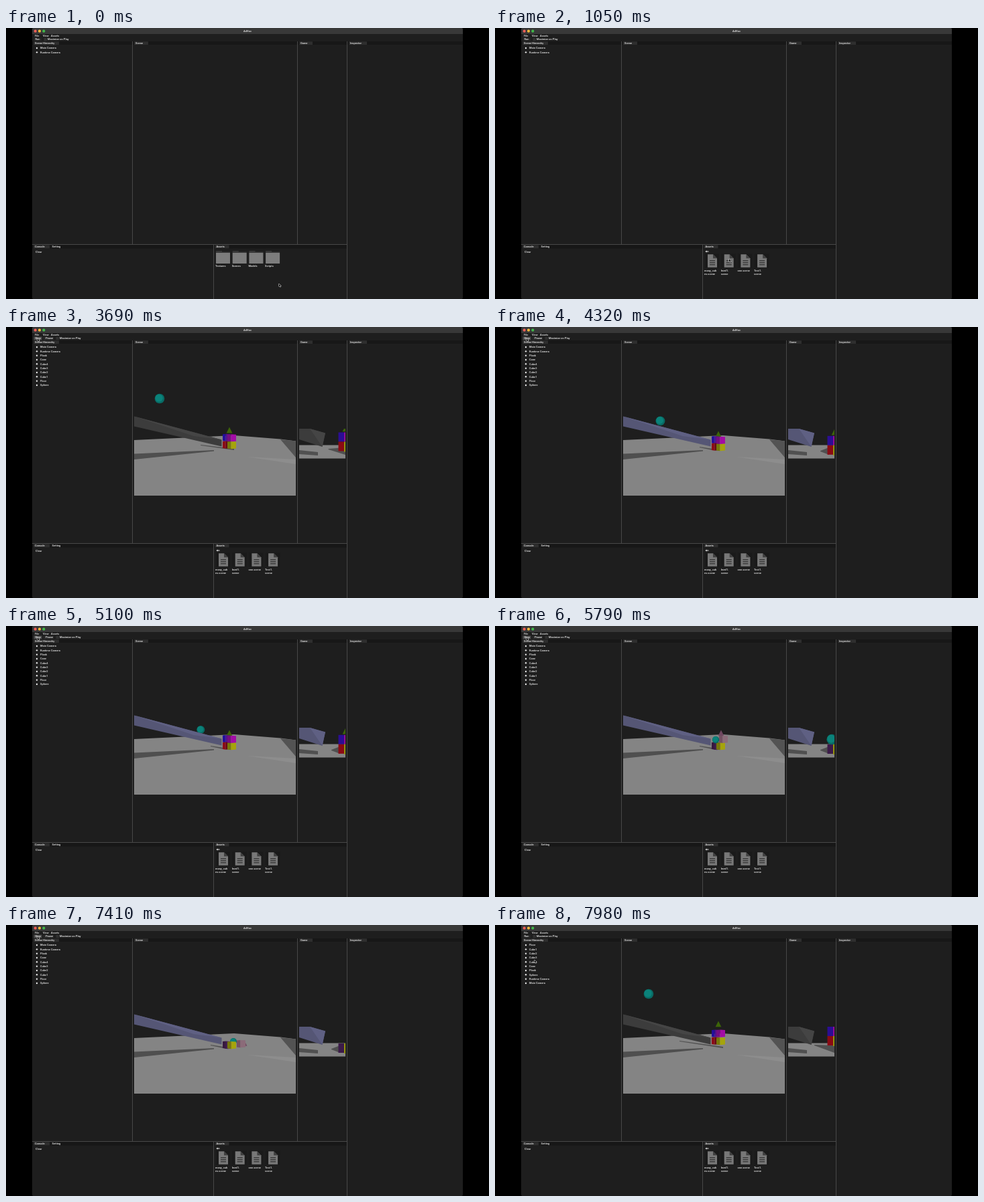
Animation of 720 by 405 pixels, one loop 8 s. Source, as an HTML page with a canvas:

```html
<!DOCTYPE html>
<html lang="en">
<head>
<meta charset="utf-8">
<style>
html, body { margin: 0; width: 100%; height: 100%; overflow: hidden; background: #000; }
canvas { display: block; width: 720px; height: 405px; }
</style>
</head>
<body>
<canvas id="stage" width="720" height="405"></canvas>
<script>
const ctx = document.getElementById('stage').getContext('2d');
const LOOP = 8000;
const OPEN = 930, DRAG = 1840, DROP = 2460, PLAY = 3520, CONTACT = 4010, HIT = 5650, STOP = 7500;
const FOLDERS = ['Textures', 'Scenes', 'Models', 'Scripts'];
const FILES = ['many_cub es.scene', 'level1. scene', 'one.scene', 'Test1. scene'];
const CAMERAS = ['Main Camera', 'Runtime Camera'];
const CUBES = ['Cube1', 'Cube2', 'Cube3', 'Cube4'];
const LOADED = [...CAMERAS, 'Plank', 'Cone', ...[...CUBES].reverse(), 'Floor', 'Sphere'];
const RELOADED = ['Floor', ...CUBES, 'Cone', 'Plank', 'Sphere', ...[...CAMERAS].reverse()];
const MOVES = [
  { start: 510, time: 270, x: 349, y: 345 },
  { start: 1680, time: 600, x: 334, y: 227 },
  { start: 2700, time: 690, x: 47, y: 17 },
  { start: 7540, time: 400, x: 59, y: 52 }
];

const mix = (a, b, p) => a + (b - a) * p;
const progress = (t, start, time) => Math.max(0, Math.min(1, (t - start) / time));
const smooth = p => p * p * (3 - 2 * p);

function box(x, y, w, h, color) {
  ctx.fillStyle = color;
  ctx.fillRect(x, y, w, h);
}

function shape(color, path) {
  ctx.fillStyle = color;
  ctx.fill(new Path2D(path));
}

// A strip with upright ends, each given by its top and height.
function strip(color, x0, top0, h0, x1, top1, h1) {
  shape(color, `M${x0} ${top0}L${x1} ${top1}v${h1}L${x0} ${top0 + h0}Z`);
}

function disc(x, y, r, color) {
  ctx.fillStyle = color;
  ctx.beginPath();
  ctx.arc(x, y, r, 0, Math.PI * 2);
  ctx.fill();
}

function text(str, x, y) {
  ctx.font = '500 4px Roboto, sans-serif';
  ctx.fillStyle = '#ececec';
  ctx.fillText(str, x, y);
}

function clipped(x, y, w, h, draw) {
  ctx.save();
  ctx.beginPath();
  ctx.rect(x, y, w, h);
  ctx.clip();
  draw();
  ctx.restore();
}

function tab(label, x, y, w) {
  box(x - 2, y - 2.3, w, 4.8, '#2e2e2e');
  text(label, x, y + 0.2);
}

function drawWindow() {
  box(0, 0, 720, 405, '#000');
  ctx.fillStyle = '#1e1e1e';
  ctx.beginPath();
  ctx.roundRect(39, 0, 642, 405, 2);
  ctx.fill();
  ctx.fillStyle = '#383838';
  ctx.beginPath();
  ctx.roundRect(39, 0, 642, 9, [2, 2, 0, 0]);
  ctx.fill();
  ['#ee5f58', '#f0b83a', '#40b94a'].forEach((color, i) => disc(43.7 + i * 6.3, 4.7, 2.1, color));
  ctx.textAlign = 'center';
  text('AdHoc', 360, 4.8);
  ctx.textAlign = 'left';
  box(39, 20, 642, 5, '#171717');
  box(39, 324, 469, 5.5, '#171717');
  ['File', 'View', 'Assets'].forEach((label, i) => text(label, 43 + i * 12, 12.2));

  const line = '#484848';
  for (const x of [188, 434, 508]) box(x, 20, 1, x < 508 ? 304 : 385, line);
  box(309, 324, 1, 81, line);
  box(39, 323, 469, 1, line);
  tab('Scene Hierarchy', 43, 22.6, 38);
  tab('Scene', 193, 22.6, 21);
  tab('Game', 439, 22.6, 20);
  tab('Inspector', 513, 22.6, 27);
  tab('Console', 43, 326.8, 24);
  tab('Assets', 313.5, 326.8, 21);
  text('Setting', 68.5, 327);
  text('Clear', 44, 334.7);
}

function drawToolbar(running, hover) {
  box(41.5, 14.6, 12, 4.8, hover ? '#4c4c4c' : '#242424');
  text(running ? 'Stop' : 'Run', 43.5, 17.1);
  if (running) {
    box(56, 14.6, 15, 4.8, '#2b2b2b');
    text('Pause', 59, 17.1);
  }
  const x = running ? 80 : 62;
  box(x - 5.5, 14.8, 4.4, 4.4, '#303030');
  text('Maximize on Play', x, 17.1);
}

function drawHierarchy(names) {
  names.forEach((name, i) => {
    const y = 30.3 + i * 6.33;
    disc(46, y - 0.3, 1.2, '#e6e6e6');
    text(name, 51, y);
  });
}

function drawFolder(x, y) {
  box(x, y, 9, 3, '#383838');
  box(x, y + 1.5, 21, 1.5, '#383838');
  box(x, y + 3, 21, 16, '#7d7d7d');
}

function drawFile(x, y) {
  box(x - 4, y - 1, 21, 21, '#1a1a1a');
  shape('#787878', `M${x} ${y}h8l6 6v13.5h-14Z`);
  shape('#404040', `M${x + 8} ${y}v6h6Z`);
  for (let i = 0; i < 3; i++) box(x + 3, y + 9 + i * 3, 8, 1, '#202020');
}

function drawAssets(opened) {
  (opened ? FILES : FOLDERS).forEach((label, i) => {
    const x = 313 + i * 24.7;
    if (opened) drawFile(x + 4, 338.3);
    else drawFolder(x, 333);
    label.split(' ').forEach((part, row) => text(part, x - 1, (opened ? 362.7 : 356) + row * 4.8));
  });
  if (opened) shape('#e2e2e2', 'M313.3 334l2.3-1.6v1.1h2.9v1h-2.9v1.1Z');
}

function cube(x, y, w, side, front) {
  const edge = w * 0.42;
  strip(side, x, y + 0.5, 10, x + edge, y, 11.2);
  strip(front, x + edge, y, 11.2, x + w, y + 0.5, 10);
}

function cone(x, top, color) {
  shape(color, `M${x} ${top}l4.4 8.8h-8.8Z`);
}

function ball(x, y, r) {
  disc(x, y, r, '#096a64');
  disc(x - r * 0.12, y - r * 0.12, r * 0.78, '#0b827a');
}

// Free fall until the ball lands, then a steady roll into the tower.
function simulate(t) {
  const time = t < STOP ? Math.max(t, PLAY) : PLAY;
  const sec = (time - PLAY) / 1000;
  const landed = time > CONTACT;
  const roll = landed ? Math.min(1.1, (time - CONTACT) / 1780) : 0;
  const crash = progress(time, HIT, 140);
  return {
    roll, landed, crash,
    fall: Math.min(6, 104 * sec * sec),
    tumble: progress(time, 5790, 520) ** 1.5,
    bruised: crash > 0.5,
    x: 229 + 100 * roll,
    y: landed ? 136 + 34 * roll ** 1.18 : 103 + 138 * sec * sec,
    r: mix(7.3, 5.2, roll)
  };
}

function plankColors(landed) {
  return landed ? ['#555675', '#5f6083'] : ['#3c3c3c', '#454545'];
}

function sceneView({ fall, landed, crash, tumble, bruised, x, y, r }) {
  shape('#848484', 'M191 169L340 162 409 167.5 432 170.5V252H191Z');
  shape('#535353', 'M409 168L432 170.5V195Z');
  shape('#8d8d8d', 'M360 194L432 198V205Z');
  strip('#4f4f4f', 191, 189.5, 8.5, 310, 184, 1.5);
  strip('#505050', 275 + fall * 5, 173 + fall, 1, landed ? 324 : 340, 182, 2);

  const ahead = tumble < 0.2;
  if (!ahead) ball(x, y, r);
  cone(mix(333 + 4 * crash, 355, tumble), mix(143.5 + fall * 2, 172, tumble), bruised ? '#704861' : '#3d6508');
  cube(323 + 3 * crash, mix(156.5 + fall * 1.1, 174, crash), 11, bruised ? '#3c185d' : '#23109b', '#51108e');
  cube(323, 167.5 + fall, 11, bruised ? '#37183f' : '#8d0c16', bruised ? '#44204d' : '#650914');
  cube(330, 168 + fall, 13, '#77780b', '#a5a40c');
  cube(mix(330 + 4 * crash, 344, tumble), mix(156.5 + fall * 1.2, 172, tumble), 13,
    bruised ? '#745263' : '#750e80', bruised ? '#8b6b79' : '#a30ca5');
  if (ahead) ball(x, y, r);

  const [face, light] = plankColors(landed);
  strip(face, 191, 133.5, 15, 321.5, 168.5, 10);
  shape(light, 'M191 133.5L321.5 168.5 280 163Z');
}

function gameView({ fall, landed, tumble, bruised, roll }) {
  box(437, 176.5, 69, 20, '#848484');
  strip('#505050', 437, 184, 6, 465, 187, 5);
  strip('#505050', 476 + fall * 1.5, 179 + fall, 1, landed ? 498 : 506, 180, 11);
  const [face, light] = plankColors(landed);
  shape(face, 'M437 152H453L476 158.5 471.5 179 437 168Z');
  shape(light, 'M453 152L476 158.5 471.5 179Z');

  const top = 152 + fall * 1.8, base = bruised ? 177 : top + 14;
  if (!bruised) {
    cone(506, top - 10, '#3d6508');
    box(495.5, top, 8.5, 14, '#2b0e94');
    box(504, top, 2, 14, '#940c99');
  }
  box(495.5, base, 8.5, 14, bruised ? '#3c1b49' : '#8b0b14');
  box(504, base, 2, 15, '#96950c');
  if (tumble < 1) ball(502 + (roll - 1) * 115, 169.5 + (roll - 1) * 87, 7.7);
}

function drawCursor(t) {
  let x = 407, y = 382;
  for (const move of MOVES) {
    const p = smooth(progress(t, move.start, move.time));
    x = mix(x, move.x, p);
    y = mix(y, move.y, p);
  }
  const arrow = new Path2D(`M${x} ${y}v4.3l1-.8.8 1.6.8-.4-.8-1.5h1.3Z`);
  ctx.strokeStyle = '#e8e8e8';
  ctx.lineWidth = 1;
  ctx.stroke(arrow);
  ctx.fillStyle = '#111';
  ctx.fill(arrow);
}

function draw(t) {
  const running = t >= PLAY && t < STOP;
  ctx.textBaseline = 'middle';
  drawWindow();
  drawToolbar(running, t > 3370 && t < 7600);
  drawHierarchy(t < DROP ? CAMERAS : t < STOP ? LOADED : RELOADED);
  drawAssets(t >= OPEN);
  if (t >= DROP) {
    const state = simulate(t);
    clipped(191, 95, 241, 157, () => sceneView(state));
    clipped(437, 152, 69, 45, () => gameView(state));
  } else if (t > DRAG) {
    ctx.strokeStyle = '#d2cc1c';
    ctx.lineWidth = 1;
    ctx.strokeRect(190.5, 95.7, 242.3, 157.2);
  }
  drawCursor(t);
}

function tick() {
  draw(performance.now() % LOOP);
  requestAnimationFrame(tick);
}
tick();
</script>
</body>
</html>
```
